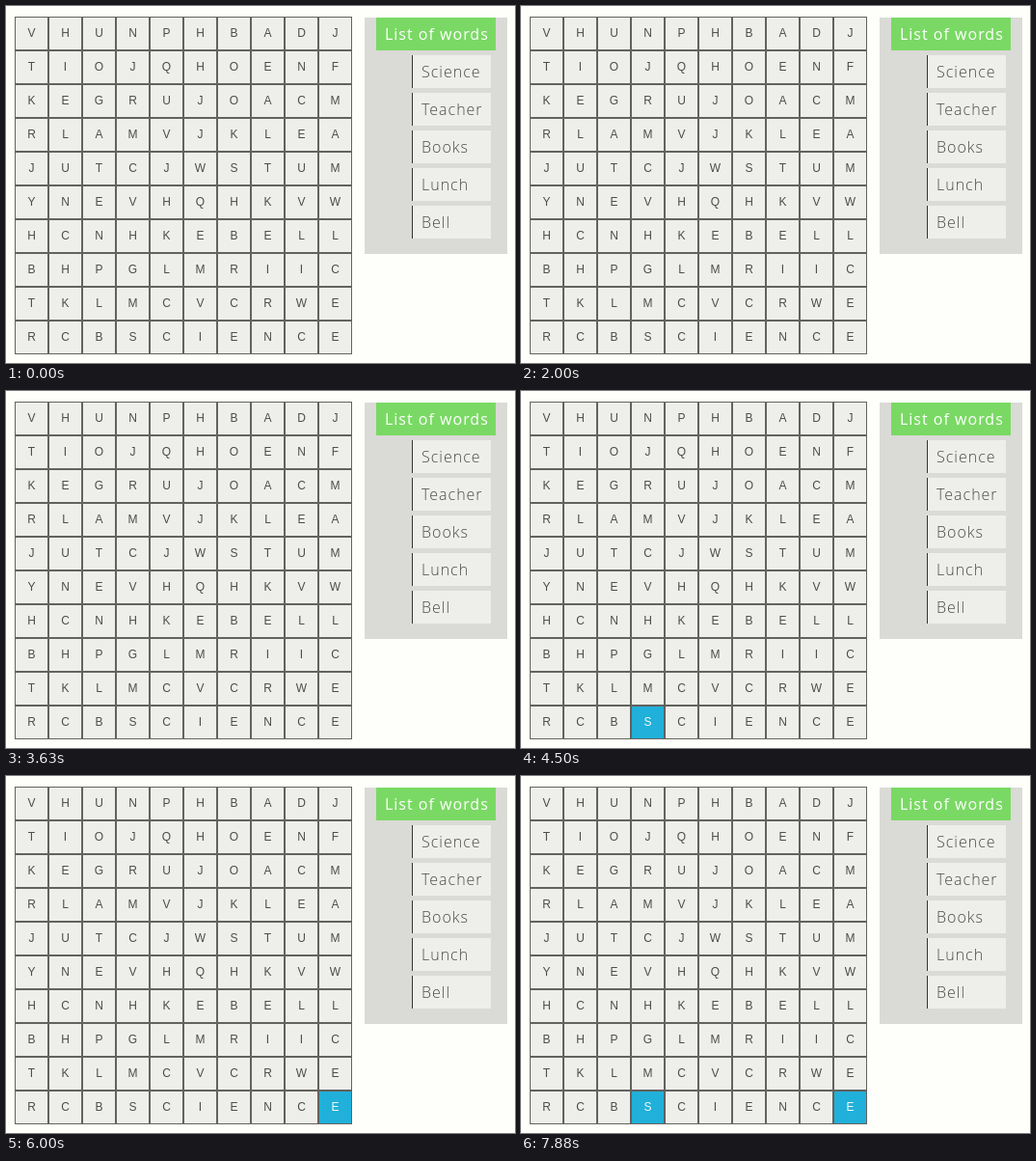
Animation of 528 by 370 pixels, one loop 8000 ms. Source, as an HTML page:

```html
<!DOCTYPE html>
<html lang="en">
<head>
<meta charset="utf-8">
<title>Word search</title>
<style>
html, body { margin: 0; width: 100%; height: 100%; overflow: hidden; background: #fefefb; }
#stage { position: relative; width: 528px; height: 370px; overflow: hidden; }
#grid {
  position: absolute; left: 9px; top: 11px;
  display: grid; grid-template-columns: repeat(10, 35px); grid-auto-rows: 35px;
  font: 12px "Liberation Sans", Arial, sans-serif; color: #4c4c4a;
}
#grid div {
  box-sizing: border-box; border: 1px solid #62625e; background: #eeeeeb;
  line-height: 33px; text-align: center;
}
#grid .on { background: #20b0d9; color: #f4fafb; }
#panel {
  position: absolute; left: 372px; top: 12px; width: 148px; height: 245px;
  background: #dadad6; font: 300 16px "Open Sans", "Noto Sans", sans-serif;
  letter-spacing: 1px; white-space: nowrap;
}
#panel h1 {
  position: absolute; left: 12px; top: 0; width: 115px; height: 34px; margin: 0;
  padding-left: 9px; background: #7ad964; color: #fff;
  font: inherit; font-weight: 400; line-height: 34px;
}
#panel ul { position: absolute; left: 49px; top: 39px; margin: 0; padding: 0; list-style: none; }
#panel li {
  box-sizing: border-box; width: 82px; height: 34px; margin-bottom: 5px;
  padding-left: 9px; border-left: 1px solid #333; background: #eeeeeb;
  color: #4a4a4a; line-height: 34px;
}
</style>
</head>
<body>
<div id="stage">
  <div id="grid"></div>
  <div id="panel">
    <h1>List of words</h1>
    <ul><li>Science</li><li>Teacher</li><li>Books</li><li>Lunch</li><li>Bell</li></ul>
  </div>
</div>
<script>
const LOOP = 8000;
const rows = [
  "VHUNPHBADJ", "TIOJQHOENF", "KEGRUJOACM", "RLAMVJKLEA", "JUTCJWSTUM",
  "YNEVHQHKVW", "HCNHKEBELL", "BHPGLMRIIC", "TKLMCVCRWE", "RCBSCIENCE"
];
const START = 93;
const SELECT_AT = 6880;

const grid = document.getElementById("grid");
const cells = [...rows.join("")].map(letter => {
  const cell = document.createElement("div");
  cell.textContent = letter;
  grid.append(cell);
  return cell;
});

// Column reached when the pointer moves one cell per step.
const sweep = (from, to, t, begin, step) => {
  const n = Math.max(0, Math.floor((t - begin) / step));
  return from + Math.sign(to - from) * Math.min(n, Math.abs(to - from));
};

function hovered(t) {
  if (t >= 1250 && t < 1630) return 89;
  if (t < 4500) return -1;
  if (t < 6130) return 90 + sweep(3, 9, t, 4500, 200);
  if (t < 7000) return 90 + sweep(9, 3, t, 6130, 75);
  return 90 + sweep(3, 9, t, 7000, 125);
}

function draw(now) {
  const t = now % LOOP;
  const hover = hovered(t);
  cells.forEach((cell, i) => {
    cell.classList.toggle("on", i === hover || (i === START && t >= SELECT_AT));
  });
}

const began = performance.now();
function tick() {
  draw(performance.now() - began);
  requestAnimationFrame(tick);
}
tick();
</script>
</body>
</html>
```
